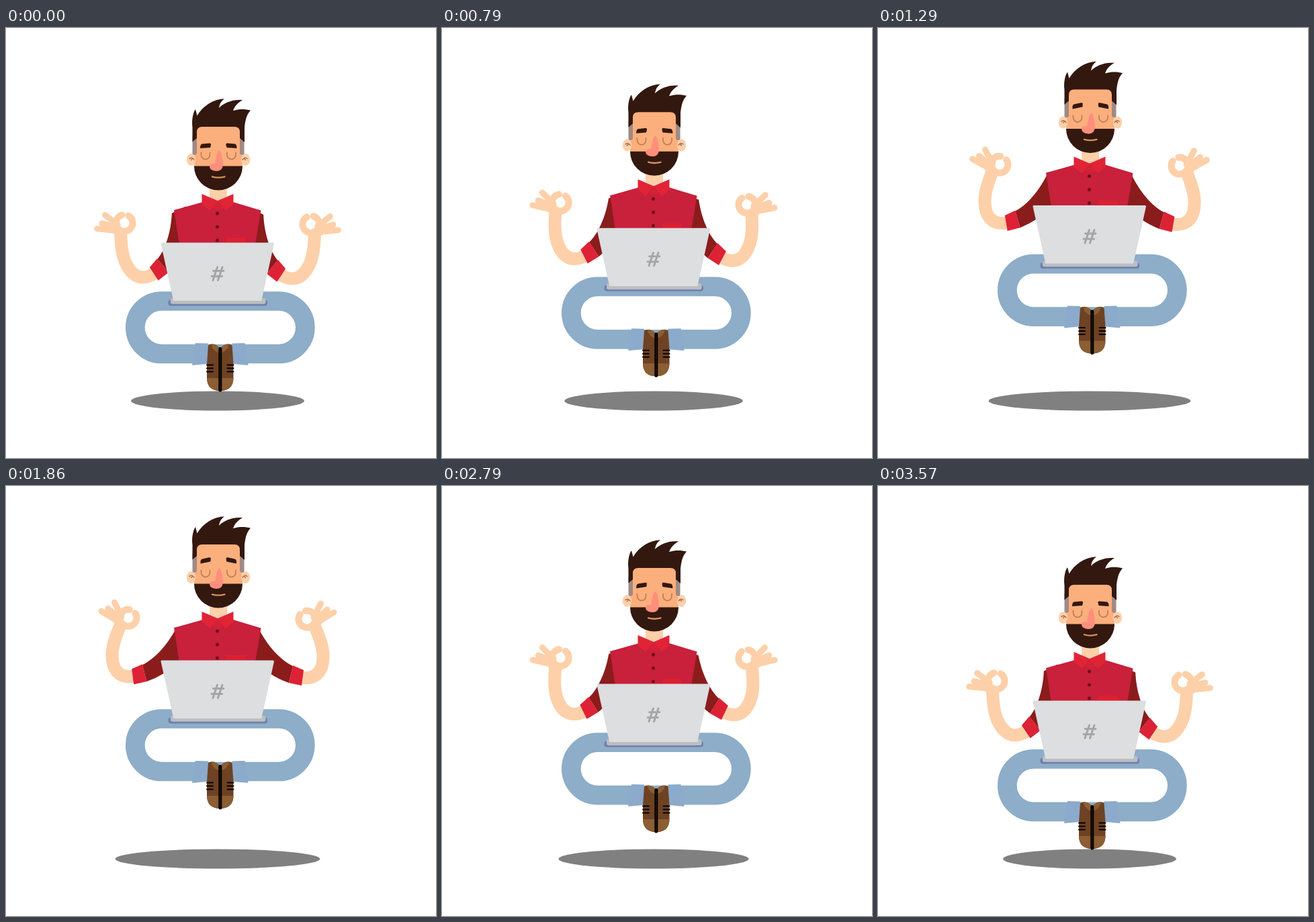
These frames come from a looping animation (640x640 px, 3.64 s). An HTML page:

```html
<!DOCTYPE html>
<html lang="en">
<head>
<meta charset="utf-8">
<title>Levitating at work</title>
<style>
  html, body { margin: 0; width: 100%; height: 100%; overflow: hidden; background: #fff; }
  svg { display: block; width: 100vw; height: 100vh; }
  .line { fill: none; stroke-linecap: round; stroke-linejoin: round; }
</style>
</head>
<body>
<svg viewBox="0 0 640 640">
  <defs>
    <!-- Left arm, fully raised -->
    <g id="arm">
      <path fill="#8b1c1c" d="M252 274C240 296 222 317 203 326L209 351Q240 340 259 318H275V274Z"/>
      <g class="line" stroke="#fdd0a9">
        <path stroke-width="19" stroke-linecap="butt" d="M192 343C165 347 157 330 158 308C159 293 165 279 171 266"/>
        <path stroke-width="9" d="M142 246L168 262M152 242L170 258M161.5 233L172 254"/>
        <path stroke-width="10" d="M192.5 249.2A12.5 12.5 0 1 1 184 243.7"/>
      </g>
      <circle cx="167" cy="259" r="8" fill="#fdd0a9"/>
      <path fill="#dd2235" d="M187 332L203 325L209 351L190 355Z"/>
    </g>
    <path id="brow" fill="#33180f" d="M289 179Q289 173 292 172.5L303 171.5Q305.500 171.500 305 174L304 178Z"/>
    <g id="shoe">
      <path fill="#8caacb" d="M282 469L301 469.500L299 500L277 502Z"/>
      <path fill="#6e4223" d="M301 472Q310 467 319 477V540Q299 540 299 520V500Z"/>
      <path fill="#8b5e34" d="M299 521H319V540Q299 540 299 521ZM305.500 471Q313 470 319 477V484Q308 482 305.500 471Z"/>
      <path class="line" stroke="#000" stroke-width="2" d="M299 501.500H308M299 506.500H308M299 511.500H308"/>
    </g>
    <g id="ear">
      <ellipse cx="275.500" cy="196" rx="6.700" ry="9" fill="#fdd0a9"/>
      <path class="line" stroke="#a8714f" stroke-width="1.500" d="M273 194.500Q277 191.500 280 196M275.500 196.500L278 194"/>
    </g>
    <path id="eye" class="line" stroke="#c08155" stroke-width="1.800" d="M290.500 185.500V188.500A6.500 7 0 0 0 303.500 188.500V185.500"/>
    <path id="collar" fill="#e02436" d="M291.500 247L315 257L303 272L291.500 262Z"/>
  </defs>

  <ellipse id="shadow" cx="315" cy="555" ry="14.500" fill="#808080"/>

  <g id="body">
    <use id="armL" href="#arm"/>
    <use id="armR" href="#arm"/>

    <rect x="192.300" y="406.500" width="253" height="78.500" rx="39.250" fill="none" stroke="#8dadc8" stroke-width="28.700"/>
    <use href="#shoe"/>
    <use href="#shoe" transform="translate(637.500) scale(-1 1)"/>
    <path class="line" stroke="#000" stroke-width="5" d="M318.800 477.500V539"/>
    <path stroke="#4a2c18" stroke-width=".8" d="M318.800 480V538"/>

    <path fill="#c9203c" d="M250 271L293 259H338L379.500 271.500L371 322H258Z"/>
    <path fill="#dc2030" d="M328 312H357V322H328Z"/>
    <path fill="#d52138" d="M315 256L306 268L315 271L324 268Z"/>
    <path fill="#fdd0a9" d="M303 236H329V251L315 257L303 252Z"/>
    <use href="#collar"/>
    <use href="#collar" transform="translate(630) scale(-1 1)"/>
    <g fill="#6b0f16">
      <circle cx="314.500" cy="276" r="2.500"/>
      <circle cx="314.500" cy="296" r="2.500"/>
      <circle cx="314.500" cy="316" r="2.500"/>
    </g>

    <path fill="#9f8a85" d="M277.500 160H354.500V189H277.500Z"/>
    <path fill="#33180f" d="M277.500 169.500V148C276 135 279 125 282 121L284.500 130.500C293 116 308 106 325 105.200C320 109 318 113 317 119C325 111 338 106 352 107.300C345 111 340 117 338 123C347 120 357 120.500 364 122.500C357 130 356 140 355 148V170L348 164H284Z"/>
    <path fill="#fbaf7d" d="M284 155Q284 147 292 147H340Q348 147 348 155V187L352 190V207H280V190L284 187Z"/>
    <use href="#ear"/>
    <use href="#ear" transform="translate(632) scale(-1 1)"/>
    <use href="#eye"/>
    <use href="#eye" x="38.500"/>
    <use id="browL" href="#brow"/>
    <use id="browR" href="#brow"/>
    <path fill="#33180f" d="M280 205.500H352A36 36 0 0 1 280 205.500Z"/>
    <path fill="#ff8f7d" d="M317.500 182C321 183 323 198 323 204Q322 213 313 213Q303 212 303 206Q304 200.500 311 202Q314 183 317.500 182Z"/>
    <path class="line" stroke="#d4935f" stroke-width="2.300" d="M307 221.300Q316 224 325.500 221.300"/>

    <rect x="241.500" y="404.500" width="147.500" height="9" rx="4" fill="#6f80b0"/>
    <rect x="245" y="402" width="141.500" height="8.800" rx="3" fill="#bcbec0"/>
    <path class="line" style="fill:#dcdee0" stroke="#dcdee0" stroke-width="3" d="M232 321H397.500L379 404.500H250.500Z"/>
    <path class="line" stroke="#a3a5a8" stroke-width="2.900" d="M308.500 361.500H324M306 369.500H321.500M314.500 356L308 375.500M322 356L315.500 375.500"/>
  </g>
</svg>

<script>
const LOOP = 3640, STEP = 71.4;
const el = id => document.getElementById(id);
const set = (id, transform) => el(id).setAttribute('transform', transform);

// Cubic bezier (2/3, 0, 1/3, 1), solved by bisection
function ease(x) {
  if (x <= 0) return 0;
  if (x >= 1) return 1;
  let lo = 0, hi = 1, s;
  for (let i = 0; i < 24; i++) {
    s = (lo + hi) / 2;
    const r = 1 - s;
    if (2 * s * r * r + s * s * r + s * s * s < x) lo = s; else hi = s;
  }
  return s * s * (3 - 2 * s);
}

// Rise to 1, then fall back to 0
const swing = (t, up, upTime, down, downTime) =>
  ease((t - up) / upTime) - ease((t - down) / downTime);

const armPose = p => `rotate(${-26 * (1 - p)} 253 286)`;

function draw(now) {
  const t = Math.floor((now % LOOP + 5) / STEP) * STEP;
  const lift = swing(t, 0, 1740, 1825, 1815);
  const spread = swing(t, 318, 1340, 2036, 1537);
  const brow = `translate(0 ${-4.5 * spread}) rotate(${-8 * spread} 297 175)`;

  set('body', `translate(0 ${-60 * lift})`);
  set('armL', armPose(swing(t, 169, 1534, 1705, 1850)));
  set('armR', 'translate(630 2) scale(-1 1) ' + armPose(swing(t, 240, 1420, 1940, 1490)));
  set('browL', brow);
  set('browR', 'translate(632.5) scale(-1 1) ' + brow);
  el('shadow').setAttribute('rx', 129 + 23.5 * spread);
}

const start = performance.now();
function tick() {
  draw(performance.now() - start);
  requestAnimationFrame(tick);
}
tick();
</script>
</body>
</html>
```
